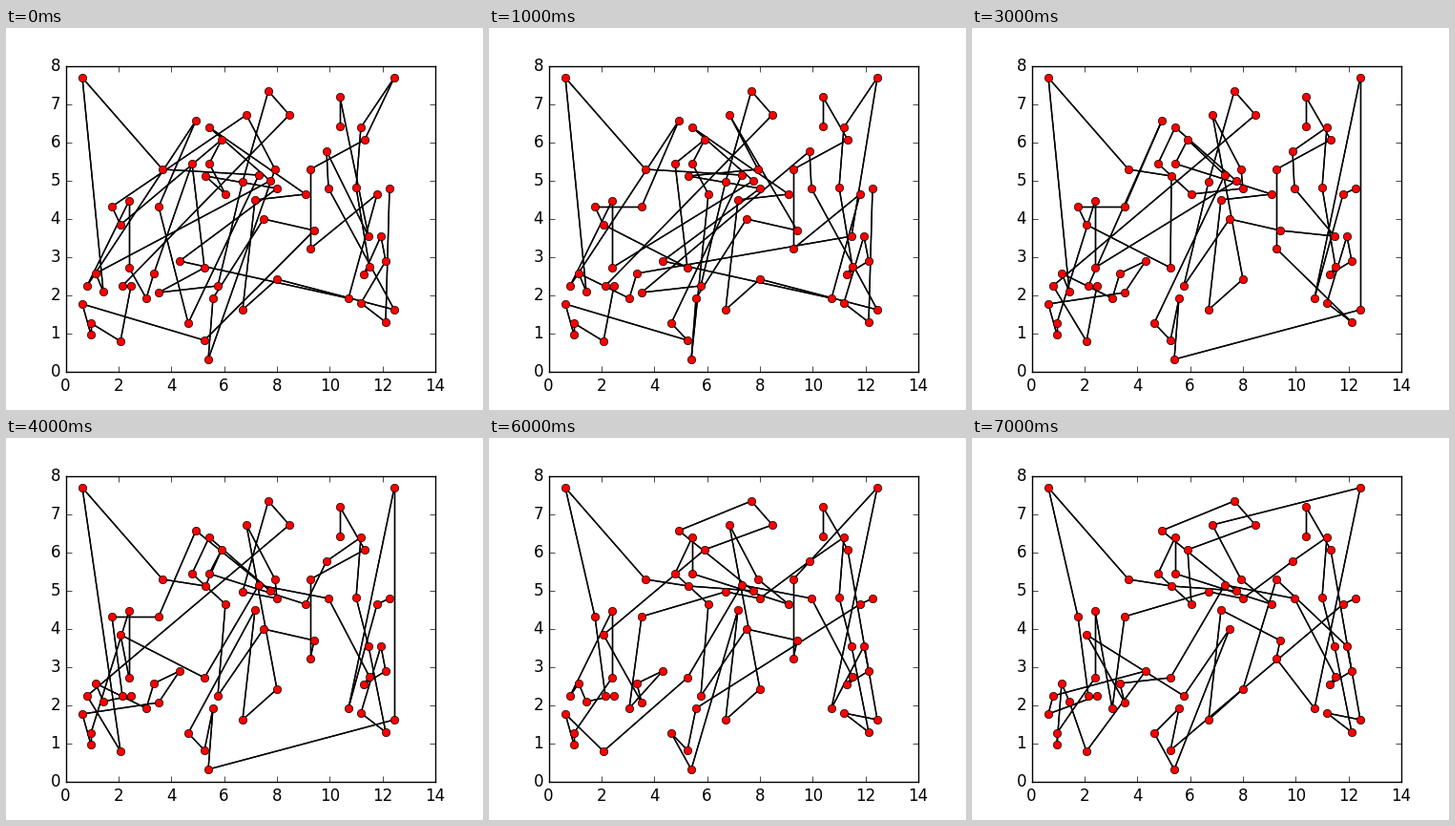
A matplotlib script for the animation above (8 s loop, 500x400 px).

```python
import matplotlib.pyplot as plt
import numpy as np
from matplotlib.animation import FuncAnimation
from matplotlib.collections import LineCollection

plt.style.use("classic")
plt.rcParams["font.family"] = "DejaVu Sans"

STEPS = 8
STEP_MS = 1000
SWAPS = 9            # segment reversals between two pictures

# City positions in stage pixels, in the order of the final route.
CITIES = np.array([
    (402, 168), (389, 174), (208, 327), (217, 283), (191, 309), (212, 347),
    (270, 200), (222, 270), (120, 206), (160, 277), (155, 257), (208, 251),
    (265, 154), (338, 168), (381, 250), (375, 258), (398, 244), (393, 218),
    (319, 148), (284, 263), (248, 295), (261, 180), (323, 212), (319, 231),
    (359, 283), (407, 52), (252, 91), (282, 148), (314, 174), (213, 142),
    (213, 104), (195, 142), (230, 174), (226, 117), (297, 91), (275, 66),
    (199, 97), (277, 160), (209, 155), (164, 148), (80, 52), (111, 187),
    (122, 270), (131, 270), (80, 289), (85, 270), (182, 244), (120, 328),
    (102, 276), (94, 257), (89, 321), (89, 309), (129, 251), (129, 181),
    (147, 283), (160, 187), (248, 161), (284, 168), (336, 129), (372, 104),
    (367, 167), (380, 218), (398, 308), (372, 288), (407, 295), (376, 117),
    (350, 72), (350, 103),
], float)
xy = np.column_stack([(CITIES[:, 0] - 62.5) * 14 / 387.5,
                      (360 - CITIES[:, 1]) / 40])


def distance(a, b):
    return np.hypot(*(xy[a] - xy[b]))


def heat(route, temperature, rng):
    """Disorder a route by reversing stretches, as annealing in reverse."""
    route = route.copy()
    done = 0
    while done < SWAPS:
        i, j = np.sort(rng.choice(np.arange(1, len(route) - 1), 2,
                                  replace=False))
        a, b, c, d = route[[i - 1, i, j, j + 1]]
        gain = distance(a, c) + distance(b, d) - distance(a, b) - distance(c, d)
        if rng.random() < np.exp(min(0, -gain / temperature)):
            route[i:j + 1] = route[i:j + 1][::-1].copy()
            done += 1
    return route


def cooling_routes():
    """Routes from the most tangled one down to the final one."""
    rng = np.random.default_rng(4)
    routes = [np.arange(len(xy))]
    for k in range(1, STEPS):
        routes.append(heat(routes[-1], 0.7 + 0.4 * k, rng))
    return routes[::-1]


routes = cooling_routes()

fig = plt.figure(figsize=(5, 4), dpi=100, facecolor="white")
ax = fig.add_axes([0.125, 0.1, 0.775, 0.8])
ax.set_xlim(0, 14)
ax.set_ylim(0, 8)
roads = ax.add_collection(
    LineCollection([], colors="black", linewidths=1, zorder=1))
ax.plot(xy[:, 0], xy[:, 1], "ro", zorder=2)


def draw(i):
    path = xy[routes[i]]
    legs = np.stack([path[:-1], path[1:]], axis=1)
    # Each road is drawn in both directions, which firms up its edges.
    roads.set_segments(np.concatenate([legs, legs[:, ::-1]]))
    return (roads,)


anim = FuncAnimation(fig, draw, frames=STEPS, interval=STEP_MS,
                     repeat=True, repeat_delay=0)
plt.show()
```
